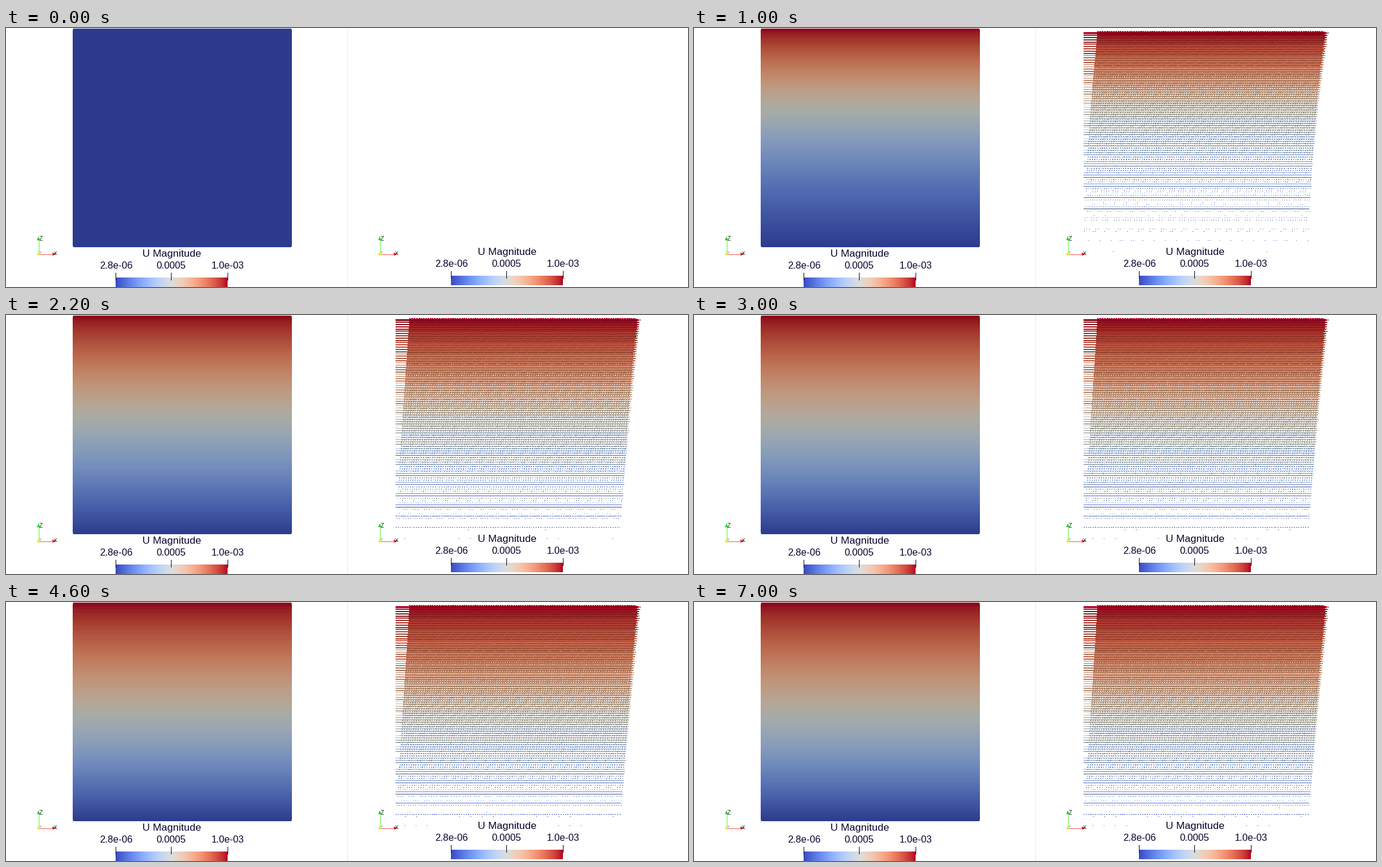
Animation of 1145x436 px, one loop 7.2 s. Source, as a matplotlib script:

```python
import numpy as np
import matplotlib
import matplotlib.pyplot as plt
from matplotlib.animation import FuncAnimation
from matplotlib.patches import Polygon, Circle

W, H, DPI = 1145, 436, 64
FRAMES, STEP_MS = 36, 200
INK = "#05052d"
CMAP = matplotlib.colormaps["coolwarm"]
FACE_LIGHT = np.array([0.78, 0.775, 0.735])   # surfaces turned to the viewer
TILT_LIGHT = np.array([0.24, 0.28, 0.36])     # gain upwards, loss downwards

# Glyph lattice: origin, spacing, count, length at full speed, channel height
GX, GY, PITCH, COLS, ROWS = 654, 8.5, 3.794, 100, 99
REACH, DEPTH = 36.0, 373.0
SHAFT, SHAFT_R, TIP_R = 0.65, 0.03, 0.1

fig = plt.figure(figsize=(W / DPI, H / DPI), dpi=DPI, facecolor="white")
ax = fig.add_axes([0, 0, 1, 1])
ax.set_xlim(0, W)
ax.set_ylim(H, 0)
ax.axis("off")


def px(size):
    return size * 72 / DPI


def label(x, y, text, size, color=INK):
    ax.text(x, y, text, fontsize=px(size), color=color, family="Liberation Sans",
            ha="center", va="baseline")


def line(x, y, color, width=1, **kw):
    ax.plot(x, y, color=color, lw=px(width), solid_capstyle="butt", **kw)


def picture(data, box, z=1):
    im = ax.imshow(data, extent=box, interpolation="nearest", aspect="auto", zorder=z)
    ax.set_xlim(0, W)
    ax.set_ylim(H, 0)
    return im


def legend(x, y):
    ramp = CMAP(np.linspace(0, 1, 188))[None, :, :3]
    picture(ramp, (x, x + 188, y + 16, y))
    for dx, text in ((0, "2.8e-06"), (93, "0.0005"), (188, "1.0e-03")):
        line([x + dx - 0.5] * 2, [y - 8, y + 4], INK, antialiased=False, zorder=3)
        label(x + dx + 0.4, y - 15, text, 16.3)
    label(x + 94, y - 35, "U Magnitude", 17.4)


def triad(x, y):
    line([x, x], [y, y - 24], "#6cf06c", 1.2)
    line([x, x + 24], [y, y], "#f07070", 1.2)
    ax.add_patch(Polygon([(x - 2.6, y - 23.5), (x + 2.6, y - 23.5), (x, y - 30)], color="#00dc14", lw=0))
    ax.add_patch(Polygon([(x + 23.5, y - 2.6), (x + 23.5, y + 2.6), (x + 30.5, y)], color="#e01010", lw=0))
    ax.add_patch(Circle((x, y), 2.2, color="#f5e614", lw=0, zorder=3))
    label(x + 3.9, y - 23, "Z", 9.5, "#202020")
    label(x + 28, y + 1.3, "X", 9, "#202020")
    label(x + 3.5, y - 1.2, "Y", 5.5, "#606060")


def speed(s, k):
    """Start-up shear flow at depth s (0 = moving lid) after k steps."""
    if k < 1:
        return np.zeros_like(s)
    decay = 0.62 + 0.2 * k
    u = 1 - s
    for n in range(1, 7):
        u = u - 2 / (n * np.pi) * np.sin(n * np.pi * s) * np.exp(-n * n * decay)
    return np.where(s < 0.2965 * k, np.clip(u, 0, 1), 0)


def panel(k):
    s = (np.arange(100) + 0.5) / 100
    return (CMAP(speed(s, k))[:, :3] * FACE_LIGHT)[:, None, :]


# Pixel centres of the glyph view
VIEW = (GX, 1072, 384, 0)
X, Y = np.meshgrid(np.arange(VIEW[0], VIEW[1]) + 0.5 - GX, np.arange(VIEW[2]) + 0.5)
NEAREST = np.rint((Y - GY) / PITCH)


def glyphs(k):
    """Point-sampled arrows: every pixel takes the surface nearest the viewer."""
    out = np.zeros(X.shape + (4,))
    front = np.zeros(X.shape)
    for shift in (-1, 0, 1):
        row = NEAREST + shift
        valid = (row >= 0) & (row < ROWS)
        u = speed(np.clip(row * PITCH / DEPTH, 0, 1), k)
        size = np.maximum(u * REACH, 1e-9)
        off = Y - GY - row * PITCH
        for tip in (False, True):
            start = SHAFT * size if tip else 0
            col = np.clip(np.floor((X - start) / PITCH), -1, COLS - 1)
            t = (X - col * PITCH) / size
            if tip:
                r = TIP_R * size * (1 - t) / (1 - SHAFT)
                inside = t <= 1
            else:
                r = SHAFT_R * size
                inside = t <= SHAFT
            hit = valid & (col >= 0) & inside & (np.abs(off) < r)
            height = np.sqrt(np.maximum(r * r - off * off, 0))
            hit &= height > front
            tilt = (off[hit] / r[hit])[:, None]
            light = FACE_LIGHT - TILT_LIGHT * tilt
            out[hit, :3] = np.clip(CMAP(u[hit])[:, :3] * light, 0, 1)
            out[hit, 3] = 1
            front[hit] = height[hit]
    return out


line([572.5, 572.5], [0, 435], "#ebebeb", antialiased=False)
legend(184, 420)
legend(747, 417)
triad(54.5, 380.7)
triad(627.5, 380.7)

block = picture(panel(0), (112, 480, 369, 1))
outline = Polygon([(113, 1), (479, 1), (480, 4), (480, 366), (479, 369),
                   (113, 369), (112, 366), (112, 4)], transform=ax.transData)
block.set_clip_path(outline)
field = picture(glyphs(0), VIEW, 2)


def draw(n):
    k = max(n - 1, 0)
    block.set_data(panel(k))
    field.set_data(glyphs(k))
    return block, field


anim = FuncAnimation(fig, draw, frames=FRAMES, interval=STEP_MS, repeat=True,
                     repeat_delay=0, blit=False)
plt.show()
```
